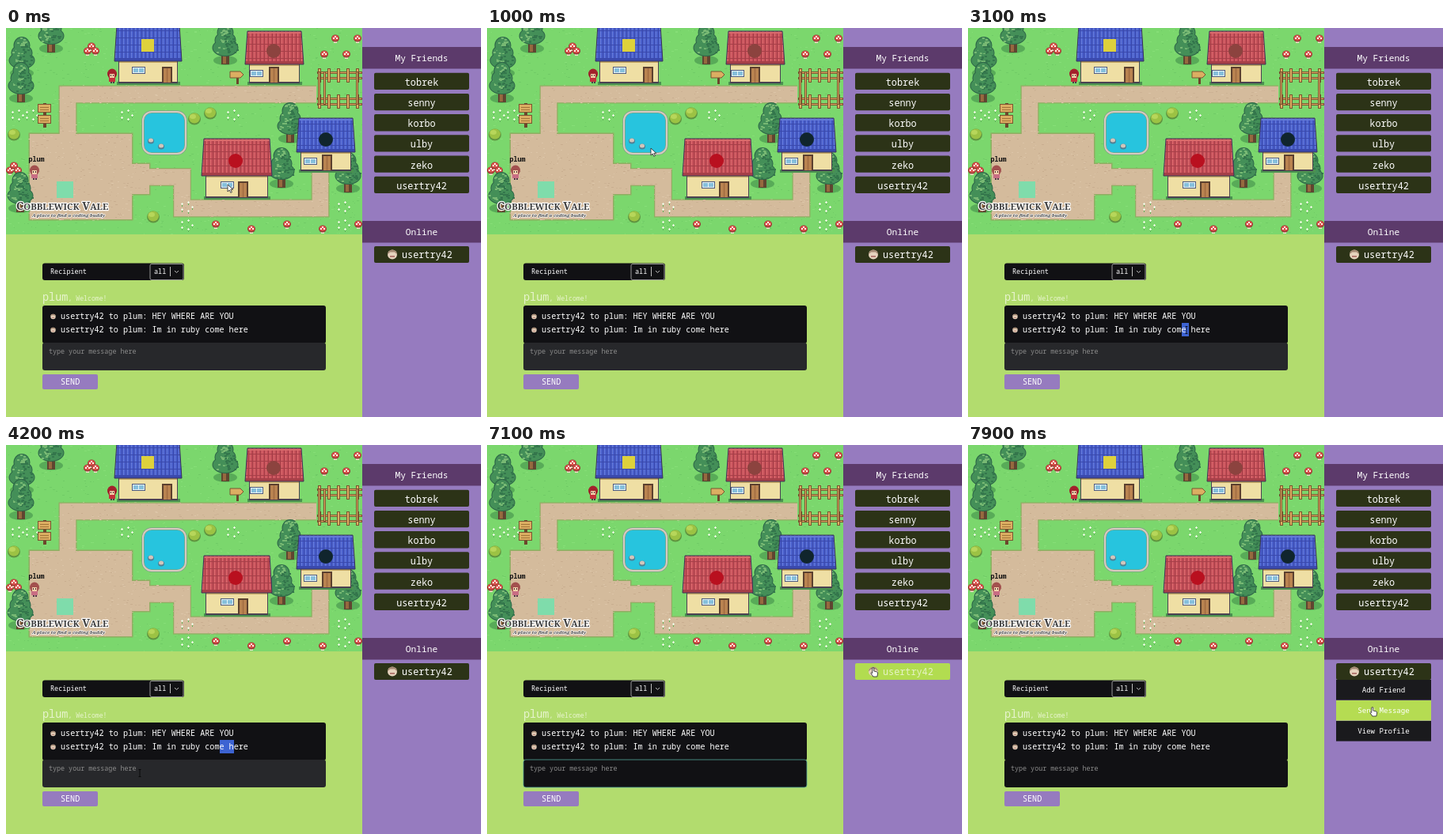
Animation of 600x492 px, one loop 8 s. Source, as an HTML page with a canvas:

```html
<!DOCTYPE html>
<html lang="en">
<head>
<meta charset="utf-8">
<title>Town chat</title>
<style>
html, body { margin: 0; width: 600px; height: 492px; overflow: hidden; background: #b2dc6e; }
canvas, svg { position: absolute; left: 0; top: 0; display: block; }
text { font: 500 11px "Noto Sans Mono", "DejaVu Sans Mono", monospace; fill: #fff; white-space: pre; }
</style>
</head>
<body>
<canvas id="map" width="450" height="261"></canvas>
<svg id="ui" width="600" height="492"></svg>
<script>
const el = id => document.getElementById(id);
const clamp = v => Math.min(1, Math.max(0, v));
const c = el('map').getContext('2d');

let seed = 7;
const rnd = () => (seed = (seed * 16807) % 2147483647) / 2147483647;

function box(color, x, y, w, h) { c.fillStyle = color; c.fillRect(x, y, w, h); }
function oval(color, x, y, rx, ry = rx) {
  c.fillStyle = color;
  c.beginPath();
  c.ellipse(x, y, rx, ry, 0, 0, 7);
  c.fill();
}
function outline(shape, color, width) {
  c.strokeStyle = color;
  c.lineWidth = width;
  c.stroke(shape);
}
function speckle(n, colors) {
  for (let i = 0; i < n; i++) {
    box(colors[i % colors.length], rnd() * 450 | 0, rnd() * 261 | 0, 1 + rnd() * 3 | 0, 1);
  }
}

// The road is painted first, then the grass goes underneath it.
function ground() {
  const lane = new Path2D('M392 84H78V135M155 188.5H222.5V228H397V180');
  const plaza = new Path2D('M30 134H159V242H30zM155 172H181V210H155z');
  outline(lane, '#8fae62', 23);
  outline(plaza, '#8fae62', 3);
  outline(lane, '#d4bb9c', 20.5);
  c.fill(plaza);
  c.fillStyle = '#d4bb9c';
  c.fill(plaza);
  c.globalCompositeOperation = 'source-atop';
  speckle(2400, ['#c8ad8f', '#dcc5a8', '#ccb294']);
  c.globalCompositeOperation = 'destination-over';
  speckle(1200, ['#70cb66', '#86de77']);
  box('#7bd76d', 0, 0, 450, 261);
  c.globalCompositeOperation = 'source-over';
}

function flowers(x, y) {
  for (let i = 0; i < 5; i++) {
    const px = x + 7 * Math.cos(i * 1.257) | 0, py = y + 6 * Math.sin(i * 1.257) | 0;
    box('#5fb258', px, py + 2, 1, 2);
    box('#eef8e4', px - 1, py, 3, 1);
    box('#eef8e4', px, py - 1, 1, 3);
  }
}
function mushroom(x, y) {
  box('#f1e2c9', x - 2, y, 4, 5);
  oval('#8f3a35', x, y - 1, 5, 4.5);
  oval('#d9504a', x, y - 1.5, 4.2, 3.6);
  for (let i = 0; i < 3; i++) box('#fff0e4', x - 3 + 2 * i, y - 2 - 2 * (i % 2), 2, 2);
}
function mushroomPatch(x, y) {
  for (let i = 0; i < 3; i++) mushroom(x + 5 * (i - 1), y + (i % 2 ? -4 : 2));
}
function bush(x, y) {
  oval('#5f9440', x, y + 1, 8, 7.5);
  oval('#9cc244', x, y, 7, 6.5);
  oval('#b7d65a', x - 2, y - 2, 4, 3);
}
function tree(x, y) {
  oval('#58ab58', x, y + 46, 15, 6);
  box('#5f4530', x - 5, y + 36, 10, 15);
  box('#96693f', x - 3, y + 36, 4, 14);
  for (const grow of [1, 0]) {
    for (let i = 2; i >= 0; i--) {
      const cy = y + 11 + 9.5 * i, rx = 9.5 + 3 * i, ry = 10;
      oval(grow ? '#2d6548' : '#448f58', x, cy, rx + grow, ry + grow);
      if (grow) continue;
      for (let n = 0; n < 26; n++) {
        const a = rnd() * 6.3, r = rnd();
        const dx = Math.cos(a) * rx * r, dy = Math.sin(a) * ry * r;
        box(dx + dy < 1 ? '#77b873' : '#34764c', x + dx | 0, cy + dy | 0, 3, 2);
      }
    }
  }
}

function win(x, y) {
  box('#4a5a80', x, y, 17, 9);
  box('#e9f5f5', x + 1, y + 1, 15, 7);
  for (const dx of [2, 9]) box('#86bfdc', x + dx, y + 2, 6, 5);
}
function house(x, y, w, roof, h, [dark, main, light], winX, doorX) {
  const eave = y + roof, base = y + h;
  box('#4b9150', x + 3, base - 2, w - 5, 4);
  box('#4a4152', x + 5, eave - 2, w - 10, h - roof + 2);
  box('#efdfa4', x + 6, eave - 2, w - 12, h - roof);
  box('#c5a965', x + 6, eave, w - 12, 2);
  win(winX, eave + 7);
  box('#5b402f', doorX, base - 21, 13, 20);
  box('#b98350', doorX + 2, base - 19, 9, 18);
  box('#9a653e', doorX + 6, base - 19, 1, 18);
  const shape = new Path2D(`M${x + 3} ${y}H${x + w - 3}L${x + w} ${eave}H${x}z`);
  c.save();
  c.clip(shape);
  box(main, x, y, w, roof);
  for (let i = 1; i < w; i += 5) {
    box(light, x + i, y, 1, roof);
    box(dark, x + i + 3, y, 1, roof);
  }
  for (let j = 7; j < roof; j += 9) box(dark, x, y + j, w, 1);
  box(light, x, y + 1, w, 2);
  box(dark, x, eave - 4, w, 4);
  c.restore();
  outline(shape, '#3a3557', 1);
}

function pond() {
  const shore = new Path2D();
  shore.roundRect(173, 106, 54, 53, 11);
  c.fillStyle = '#27c4de';
  c.fill(shore);
  outline(shore, '#7aa583', 3.5);
  outline(shore, '#d8c9c0', 2);
  for (const i of [0, 1]) {
    oval('#4f7f94', 183 + 13 * i, 143 + 7 * i, 4, 3.5);
    oval('#d3c6bb', 183 + 13 * i, 142 + 7 * i, 3, 2.5);
  }
}
function plank(x, y, w, h) {
  box('#7b5430', x, y, w, h);
  box('#dcae62', x + 1, y + 1, w - 2, h - 2);
}
function fence() {
  for (const y of [55, 62, 88, 95]) plank(393, y, 57, 3);
  for (let x = 394; x < 450; x += 12) for (const y of [51, 84]) plank(x, y, 4, 18);
  for (const x of [394, 401, 442]) plank(x, 55, 3, 42);
}
function signs() {
  box('#6b472c', 47, 95, 4, 31);
  for (const y of [96, 110]) {
    plank(40, y, 17, 11);
    for (const dy of [4, 7]) box('#a47539', 43, y + dy, 11, 1);
  }
  box('#6b472c', 291, 63, 3, 8);
  const arrow = new Path2D('M283 55h13l4 4-4 4h-13z');
  c.fillStyle = '#dcae62';
  c.fill(arrow);
  outline(arrow, '#7b5430', 1);
}
function person(x, y, hair, dress) {
  oval(hair, x, y, 6, 6.5);
  box('#f5cfaa', x - 3, y, 6, 5);
  for (const dx of [-2, 1]) {
    box('#4a2b35', x + dx, y + 1, 1, 2);
    box('#513447', x + dx, y + 10, 2, 2);
  }
  box(dress, x - 4, y + 5, 8, 5);
}

function drawMap() {
  const blue = ['#3a49ad', '#4a60cc', '#6479d8'], red = ['#a63f48', '#c6505a', '#d96a6c'];
  ground();
  for (const x of [14, 32, 152, 286]) flowers(x, 110);
  for (const x of [228, 426]) for (const y of [226, 249]) flowers(x, y);
  for (let i = 0; i < 4; i++) mushroom(402 + 14 * i, i % 2 ? 14 : 34);
  for (let i = 0; i < 5; i++) mushroom(265 + 45 * i, 249 + 6 * (i % 2));
  mushroomPatch(108, 28);
  mushroomPatch(10, 179);
  [[10, 134], [238, 114], [258, 107], [186, 238]].forEach(p => bush(...p));
  [[57, -20], [20, 11], [19, 43], [277, -5], [359, 94], [348, 151], [432, 157], [18, 182]]
    .forEach(p => tree(...p));
  house(137, -4, 85, 46, 74, blue, 159, 197);
  house(302, 4, 74, 42, 66, red, 308, 332);
  house(247, 140, 89, 47, 75, red, 271, 293);
  house(367, 114, 74, 43, 67, blue, 376, 399);
  pond();
  fence();
  signs();
  person(36, 180, '#a2504e', '#c96d84');
  person(134, 58, '#a3222c', '#c4303a');
  box('#ded13c', 171, 14, 16, 16);
  oval('#8c433f', 338, 29, 9);
  oval('#b9101f', 290, 168, 9);
  oval('#10252d', 404, 141, 9);
  box('#7fdcab', 64, 194, 21, 21);
}

const rect = (x, y, w, h, fill, more = '') =>
  `<rect x="${x}" y="${y}" width="${w}" height="${h}" fill="${fill}" ${more}/>`;
const text = (x, y, size, str, style = '', more = '') =>
  `<text x="${x}" y="${y}" style="font-size:${size}px;${style}" ${more}>${str}</text>`;
const label = (y, size, str) => text(525, y, size, str, 'text-anchor:middle');
const face = (x, y, r) => `<g transform="translate(${x} ${y}) scale(${r})">
  <circle r="1" fill="#e6d3bd"/><path d="M-1 0a1 1 0 0 1 2 0l-.5-.5h-1z" fill="#a58a74"/>
  <path d="M-.5 .4h1" stroke="#a5605a" stroke-width=".25"/></g>`;

const me = 'plum', friend = 'usertry42';
const friends = ['tobrek', 'senny', 'korbo', 'ulby', 'zeko', friend];
const items = ['Add Friend', 'Send Message', 'View Profile'];
const lines = ['HEY WHERE ARE YOU', 'Im in ruby come here'];
const halo = "font-family:'Noto Serif',serif;fill:#3a3a3a;paint-order:stroke;stroke:#fff;stroke-linejoin:round;";

function buildUi() {
  const town = 'Cobblewick Vale'.replace(/[a-z]+/g, s => `<tspan font-size="11.2">${s.toUpperCase()}</tspan>`);
  const header = (y, str) => rect(450, y, 150, 27.5, '#5c3a6b') + label(y + 17.5, 11.2, str);

  el('ui').innerHTML =
    text(28.5, 169, 8.4, me, 'fill:#111;font-weight:700') +
    text(13, 229.5, 14, town, halo + 'font-weight:900;stroke-width:2.4px') +
    text(33, 239, 6, 'A place to find a coding buddy', halo + 'font-style:italic;font-weight:700;stroke-width:1.3px') +

    rect(450, 0, 150, 492, '#967bbf') +
    header(24, 'My Friends') +
    friends.map((name, i) => rect(465, 56.7 + i * 26.2, 120, 21.3, '#2c3317', 'rx="2"') +
      label(72.8 + i * 26.2, 11.8, name)).join('') +
    header(244, 'Online') +
    rect(465, 276, 120, 21, '#2c3317', 'rx="2" id="online"') +
    face(488, 286.5, 6) + text(500, 291, 11.8, friend, '', 'id="onlineName"') +

    rect(46, 297.5, 179, 21.5, '#111114', 'rx="3"') + text(56, 311, 8.5, 'Recipient') +
    rect(182, 298.5, 42, 20, '#111114', 'rx="2" stroke="#999"') + text(187, 311, 8.5, 'all') +
    '<path d="M207.5 302v12M213 307l2.5 2.5 2.5-2.5" fill="none" stroke="#bbb"/>' +
    text(46, 345, 13.5, me + '<tspan font-size="8.2">, Welcome!</tspan>', 'fill:#e8f4cf') +
    rect(46, 351, 358, 48, '#111114', 'rx="3"') +
    rect(270, 373, 18, 17, '#3d63d2', 'id="selection"') +
    lines.map((msg, i) => face(59.5, 365 + i * 17, 3.2) +
      text(69, 368 + i * 17, 10.13, `${friend} to ${me}: ${msg}`)).join('') +
    rect(46, 398, 358, 35, '#27282b', 'rx="3" id="field"') +
    text(54, 411.5, 8.4, 'type your message here', 'fill:#8b8b8b') +
    rect(46, 438, 70, 19, '#967bbf', 'rx="2"') + text(69, 451, 10.1, 'SEND') +

    '<g id="menu">' + items.map((item, i) =>
      rect(465, 297 + i * 26, 120, 25.6, '#1a1a1d', 'class="item"') + label(313 + i * 26, 9.1, item)).join('') + '</g>' +
    `<g id="cursor" stroke-width=".8">
      <path id="arrow" d="M0 0v9l2.2-2 1.6 3.4 1.6-.8-1.6-3.2h3z" fill="#fff" stroke="#222"/>
      <path id="beam" d="M-1.5-4.5h3M0-4.5v9M-1.5 4.5h3" fill="none" stroke="#050505"/>
      <path id="hand" d="M-1.2-5q1.2-1 2 0v4l4 1q1 .6.8 2l-.8 4h-5l-3-4.5q.6-1.4 2 0z" fill="#fff" stroke="#222"/>
    </g>`;
}

// start time, end time, destination of each pointer move
const moves = [[100, 400, 168, 180], [600, 800, 207, 152], [2000, 2600, 186, 362],
  [2700, 3000, 270, 382], [3000, 3300, 288, 382], [3300, 4200, 169, 415],
  [4600, 5200, 152, 405], [5400, 6800, 488, 287], [7300, 7700, 511, 337]];

function pointer(t) {
  return moves.reduce(([x, y], [from, to, toX, toY]) => {
    const k = clamp((t - from) / (to - from));
    return [x + (toX - x) * k, y + (toY - y) * k];
  }, [280, 198]);
}
const show = (id, on) => el(id).setAttribute('visibility', on ? 'visible' : 'hidden');
const fill = (id, color) => { el(id).style.fill = color; };
const inside = (x, y, l, t, r, b) => x >= l && x < r && y >= t && y < b;

function render(now) {
  const t = Math.floor(now % 8000 / 100) * 100;
  const [x, y] = pointer(t);
  const visible = t < 5400 || t >= 6300;
  const menu = t >= 7300;
  const hover = visible && inside(x, y, 465, 276, 585, 297);
  const onItem = menu && inside(x, y, 465, 297, 585, 375) ? Math.floor((y - 297) / 26) : -1;
  const kind = hover || onItem >= 0 ? 'hand' : inside(x, y, 46, 355, 404, 433) ? 'beam' : 'arrow';

  el('cursor').setAttribute('transform', `translate(${x} ${y})`);
  for (const id of ['arrow', 'beam', 'hand']) show(id, visible && id === kind);

  show('selection', t >= 3000 && t < 4500);
  el('selection').setAttribute('width', 18 * clamp((t - 2900) / 400));

  const focus = clamp((t - 4400) / 400);
  fill('field', `color-mix(in srgb, #111114 ${focus * 100}%, #27282b)`);
  el('field').setAttribute('stroke', t < 7300 ? `rgba(83,163,151,${focus * .8})` : 'none');

  fill('online', hover ? '#b2dc50' : '#2c3317');
  fill('onlineName', hover ? '#e6f2c4' : '#fff');
  show('menu', menu);
  document.querySelectorAll('.item').forEach((item, i) =>
    item.setAttribute('fill', i === onItem ? '#b5dc52' : '#1a1a1d'));
}

drawMap();
buildUi();
const start = performance.now();
function tick() {
  render(performance.now() - start);
  requestAnimationFrame(tick);
}
tick();
</script>
</body>
</html>
```
